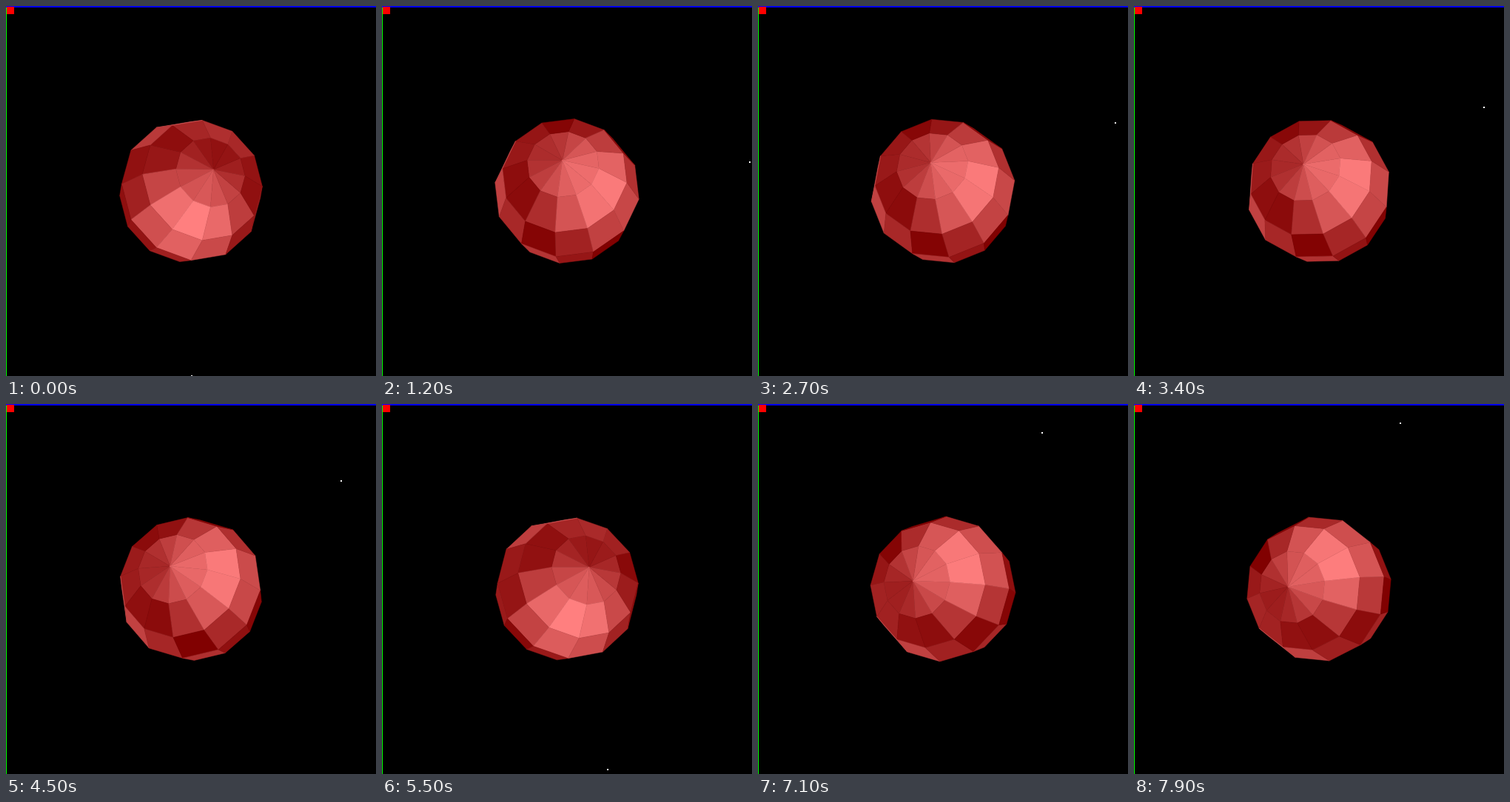
These frames come from a looping animation (500 by 500 pixels, 8 s). An HTML page with a canvas:

```html
<!DOCTYPE html>
<html lang="en">
<head>
<meta charset="utf-8">
<title>Lit sphere</title>
<style>
  html, body { margin: 0; width: 100%; height: 100%; overflow: hidden; background: #000; }
  canvas { display: block; width: 500px; height: 500px; }
</style>
</head>
<body>
<canvas id="stage" width="500" height="500"></canvas>
<script>
const ctx = document.getElementById('stage').getContext('2d');
const FRAME_MS = 100, FRAMES = 80;
const CENTER = 250, RADIUS = 98.5, ORBIT = 250, EYE_Z = 500;
const SEGMENTS = 12, BANDS = 6;
const rad = deg => deg * Math.PI / 180;
const TILT = rad(18), cosT = Math.cos(TILT), sinT = Math.sin(TILT);

const sub = (a, b) => a.map((v, i) => v - b[i]);
const dot = (a, b) => a[0] * b[0] + a[1] * b[1] + a[2] * b[2];
const cross = (a, b) => [
  a[1] * b[2] - a[2] * b[1],
  a[2] * b[0] - a[0] * b[2],
  a[0] * b[1] - a[1] * b[0]
];
const unit = a => {
  const len = Math.hypot(...a);
  return a.map(v => v / len);
};

// Point on the sphere, tilted about the y axis and then the x axis; y is up.
function spherePoint(band, seg) {
  const polar = Math.PI * band / BANDS, lon = 2 * Math.PI * seg / SEGMENTS;
  const x = Math.sin(polar) * Math.cos(lon);
  const y = Math.sin(polar) * Math.sin(lon);
  const z = Math.cos(polar);
  const z1 = z * cosT - x * sinT;
  return [x * cosT + z * sinT, y * cosT + z1 * sinT, z1 * cosT - y * sinT]
    .map(v => v * RADIUS);
}

const faces = [];
for (let b = 0; b < BANDS; b++) {
  for (let s = 0; s < SEGMENTS; s++) {
    const points = [
      spherePoint(b, s), spherePoint(b + 1, s),
      spherePoint(b + 1, s + 1), spherePoint(b, s + 1)
    ];
    const normal = unit(cross(sub(points[2], points[0]), sub(points[3], points[1])));
    const middle = [0, 1, 2].map(i => points.reduce((sum, p) => sum + p[i] / 4, 0));
    if (normal[2] > 0) faces.push({ points, normal, middle });
  }
}

// Steps play in name order: each run of ten is followed by its two-digit step.
function stepAt(index) {
  if (index === 0) return 0;
  const run = Math.floor((index - 1) / 11), pos = (index - 1) % 11;
  return pos < 10 ? 100 + 10 * run + pos : 10 + run;
}

// Highlight from the point halfway between the light and the eye, on both sides.
function shade(normal, middle, halfway) {
  const level = Math.abs(dot(normal, unit(sub(halfway, middle))));
  const white = Math.round(127 * level);
  return `rgb(${128 + white},${white},${white})`;
}

function box(color, x, y, w, h) {
  ctx.fillStyle = color;
  ctx.fillRect(x, y, w, h);
}

function draw(step) {
  box('#000', 0, 0, 500, 500);

  // The turn adds up, so it grows with the square of the step.
  const turn = rad(0.0045 * step * (step + 1));
  const c = Math.cos(turn), s = Math.sin(turn);
  const spin = ([x, y, z]) => [x * c - y * s, x * s + y * c, z];

  const orbit = rad(0.9 * step - 90);
  const lx = ORBIT * Math.cos(orbit), ly = ORBIT * Math.sin(orbit);
  const halfway = [lx / 2, ly / 2, EYE_Z / 2];

  ctx.lineWidth = 0.5;
  ctx.lineJoin = 'round';
  for (const { points, normal, middle } of faces) {
    ctx.beginPath();
    for (const p of points) {
      const [x, y] = spin(p);
      ctx.lineTo(CENTER + x, CENTER - y);
    }
    ctx.closePath();
    ctx.fillStyle = ctx.strokeStyle = shade(spin(normal), spin(middle), halfway);
    ctx.fill();
    ctx.stroke();
  }

  box('#0f0', 0, 0, 1, 500);
  box('#00f', 0, 0, 500, 2);
  box('#f00', 1, 1, 10, 10);
  const place = v => Math.min(499, Math.floor(v + 1e-6));
  box('#fff', place(CENTER + lx), place(CENTER - ly), 2, 2);
}

function tick() {
  const index = Math.floor(performance.now() / FRAME_MS) % FRAMES;
  draw(stepAt(index));
  requestAnimationFrame(tick);
}
tick();
</script>
</body>
</html>
```
